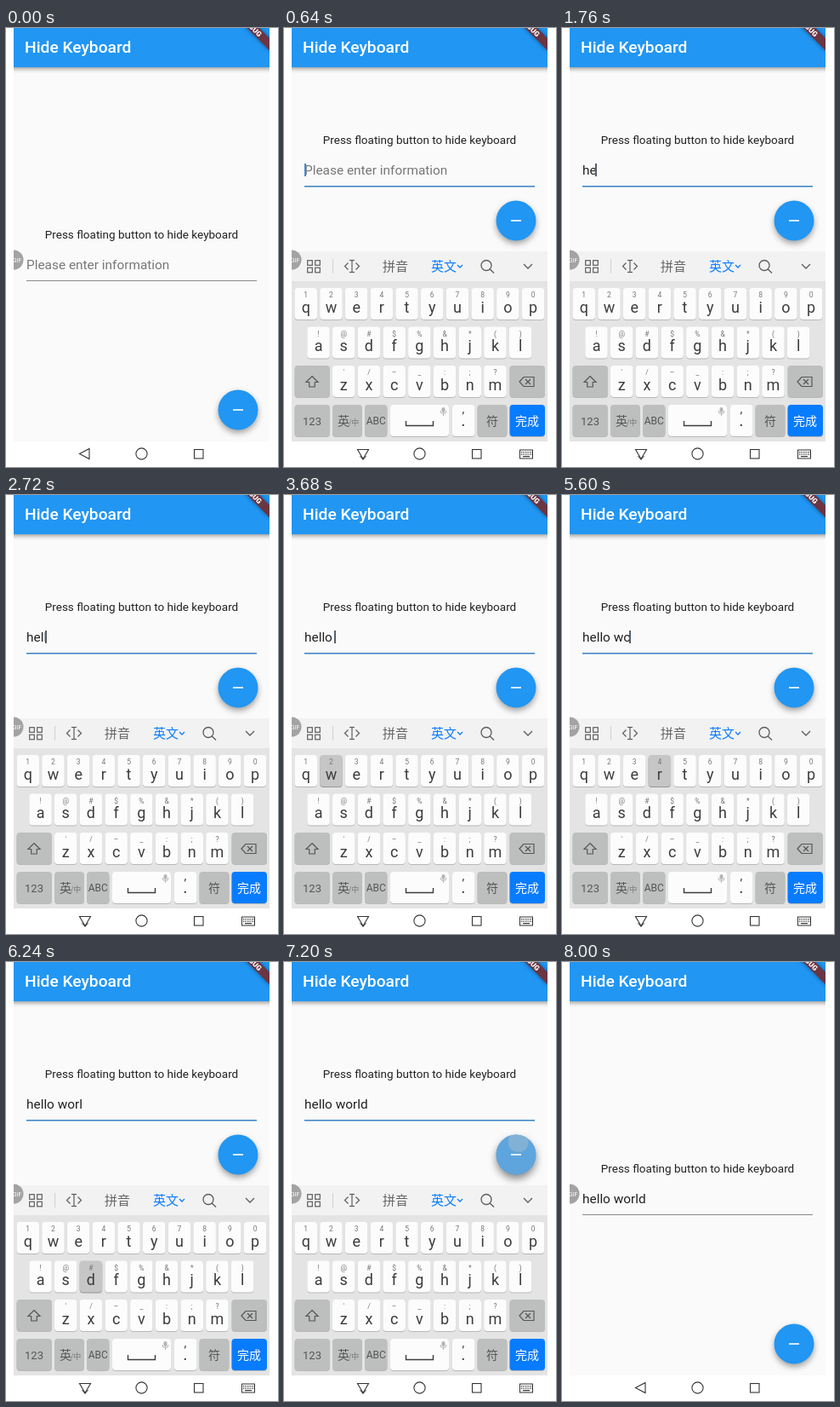
An HTML page with a canvas that plays this animation: 320 px wide and 515 px high, repeating every 9600 ms.

```html
<!DOCTYPE html>
<html lang="zh-Hans">
<head>
<meta charset="utf-8">
<style>
html, body { margin: 0; width: 100%; height: 100%; overflow: hidden; background: #fff; }
canvas { display: block; width: 320px; height: 515px; }
</style>
</head>
<body>
<canvas id="stage"></canvas>
<script>
const canvas = document.getElementById('stage');
const ctx = canvas.getContext('2d');
const dpr = window.devicePixelRatio || 1;
canvas.width = 320 * dpr;
canvas.height = 515 * dpr;

const LOOP = 9600, STEP = 160;
const LEFT = 9, RIGHT = 310, INSET = 222;
const OPEN_AT = 640, CLOSE_AT = 7520, TAP_AT = 7040, SETTLED_AT = 8000;
const ROBOTO = 'Roboto, sans-serif';
const CJK = '"Noto Sans CJK SC", "Noto Sans CJK", sans-serif';
const BLUE = '#2196f3';

// Each press lasts one step; the letter appears on release.
const presses = [
  [1280, 'h'], [1600, 'e'], [2080, 'l'], [2560, 'l'], [2880, 'o'], [3360, ' '],
  [3680, 'w'], [4960, 'o'], [5600, 'r'], [5920, 'l'], [6240, 'd']
];
const blinks = [480, 800, 1280, 1920, 2400, 2880, 3360, 3840, 4320, 4800,
  5280, 5760, 6400, 6720, 7360, 7520];

const rows = [
  { x: 12.5, y: 305, keys: 'qwertyuiop', marks: '1234567890' },
  { x: 27.3, y: 350.5, keys: 'asdfghjkl', marks: '!@#$%&*()' },
  { x: 57, y: 396, keys: 'zxcvbnm', marks: "'/–_:;?" }
];
const PITCH = 29.7, KEY_W = 26.5, KEY_H = 37;

function rect(x, y, w, h, color) {
  ctx.fillStyle = color;
  ctx.fillRect(x, y, w, h);
}

function disc(x, y, r, color) {
  ctx.fillStyle = color;
  ctx.beginPath();
  ctx.arc(x, y, r, 0, Math.PI * 2);
  ctx.fill();
}

function ring(x, y, r, color, width) {
  ctx.strokeStyle = color;
  ctx.lineWidth = width;
  ctx.beginPath();
  ctx.arc(x, y, r, 0, Math.PI * 2);
  ctx.stroke();
}

function line(points, color, width = 1.2, close = false) {
  ctx.strokeStyle = color;
  ctx.lineWidth = width;
  ctx.beginPath();
  points.forEach(([x, y]) => ctx.lineTo(x, y));
  if (close) ctx.closePath();
  ctx.stroke();
}

function box(x, y, w, h, color, width = 1.2) {
  ctx.strokeStyle = color;
  ctx.lineWidth = width;
  ctx.strokeRect(x, y, w, h);
}

function text(str, x, y, size, color, { align = 'center', weight = 400, family = ROBOTO } = {}) {
  ctx.font = `${weight} ${size}px ${family}`;
  ctx.textAlign = align;
  ctx.fillStyle = color;
  ctx.fillText(str, x, y);
}

function withShadow(alpha, blur, dy, draw) {
  ctx.save();
  ctx.shadowColor = `rgba(0,0,0,${alpha})`;
  ctx.shadowBlur = blur * dpr;
  ctx.shadowOffsetY = dy * dpr;
  draw();
  ctx.restore();
}

function drawBanner() {
  ctx.save();
  ctx.translate(RIGHT, -21);
  ctx.rotate(Math.PI / 4);
  withShadow(0.45, 5, 0, () => rect(-34, 23.4, 68, 10, '#6b3542'));
  text('DEBUG', 0, 31.5, 8.5, '#fff', { weight: 900 });
  ctx.restore();
}

function drawAppBar() {
  withShadow(0.4, 5, 2, () => rect(LEFT - 10, -10, RIGHT - LEFT + 20, 56, BLUE));
  text('Hide Keyboard', 22, 29, 19.2, '#fff', { align: 'left', weight: 500 });
  drawBanner();
}

function drawField(t, lift, typed) {
  const focused = t >= 480 && t < CLOSE_AT;
  text('Press floating button to hide keyboard', 159.5, 247 - lift, 13.5, '#212121');
  text(typed || 'Please enter information', 24, 283 - lift, 15.4,
    typed ? '#212121' : '#777', { align: 'left' });
  rect(24, 296 - lift, 271, focused ? 1.6 : 1, focused ? '#4488c8' : '#8a8a8a');

  if (focused && blinks.filter(b => b <= t).length % 2) {
    ctx.font = `400 15.4px ${ROBOTO}`;
    const end = 24 + ctx.measureText(typed).width;
    rect(Math.max(24, Math.floor(end - 1.6)), 270 - lift, 2, 15, typed ? '#56606c' : '#3f87d0');
  }
}

function drawButton(t, lift) {
  const x = 273, y = 448 - lift, r = 23.5;
  const touched = t >= TAP_AT && t < SETTLED_AT;
  withShadow(touched ? 0.45 : 0.36, touched ? 10 : 7, touched ? 5 : 3.5, () => disc(x, y, r, BLUE));
  if (touched) {
    const fade = Math.min(1, (SETTLED_AT - t) / 480);
    const spread = Math.min(1, (t - TAP_AT) / 480);
    ctx.save();
    ctx.beginPath();
    ctx.arc(x, y, r, 0, Math.PI * 2);
    ctx.clip();
    ctx.globalAlpha = fade;
    disc(x, y, r, 'rgba(188,188,188,0.4)');
    disc(277 - 4 * spread, y - 17 + 6 * spread, 6 + 18 * spread, 'rgba(200,200,200,0.33)');
    ctx.restore();
  }
  rect(x - 6, y - 0.8, 12, 1.6, '#fff');
}

function key(x, y, w, color = '#fcfcfc', pressed = false) {
  const shape = (dy, fill) => {
    ctx.fillStyle = fill;
    ctx.beginPath();
    ctx.roundRect(x, y + dy, w, KEY_H, 4);
    ctx.fill();
  };
  shape(1, pressed ? '#969696' : '#b8b8b8');
  shape(0, pressed ? '#c6c6c6' : color);
}

function drawToolbar() {
  const ink = '#5c5c5c';
  rect(LEFT, 262, RIGHT - LEFT, 35, '#f2f2f2');
  for (const x of [27.7, 36.7])
    for (const y of [272.7, 281.2]) box(x, y, 5.6, 5.6, ink);
  rect(57, 271, 1, 17, '#d0d0d0');
  line([[80, 273], [80, 286]], ink);
  line([[77, 272.5], [83, 272.5]], ink);
  line([[77, 286.5], [83, 286.5]], ink);
  line([[75.5, 275.5], [71.5, 279.5], [75.5, 283.5]], ink);
  line([[84.5, 275.5], [88.5, 279.5], [84.5, 283.5]], ink);
  text('拼音', 131, 285, 15, '#666', { family: CJK });
  text('英文', 188, 285, 15, '#0a7cff', { family: CJK });
  line([[204, 278], [207, 281], [210, 278]], '#0a7cff', 1.3);
  ring(238, 278.5, 6, ink, 1.3);
  line([[242.3, 283], [247, 287.5]], ink, 1.4);
  line([[282, 277], [287, 282], [292, 277]], ink, 1.3);
}

function drawKeyboard(held) {
  const grey = '#bdbfbf', ink = '#3c3c3c';
  rect(LEFT, 262, RIGHT - LEFT, 223, '#e4e4e4');
  drawToolbar();

  for (const { x, y, keys, marks } of rows) {
    [...keys].forEach((letter, i) => {
      const left = x + i * PITCH, mid = left + KEY_W / 2;
      key(left, y, KEY_W, undefined, letter === held);
      text(marks[i], mid, y + 11, 8.5, '#777');
      text(letter, mid, y + 28.5, 18, ink);
    });
  }

  const y3 = rows[2].y, y4 = 442;
  key(12.5, y3, 41.5, grey);
  line([[33, 408.5], [40, 415.5], [36.3, 415.5], [36.3, 421], [29.7, 421], [29.7, 415.5], [26, 415.5]],
    '#555', 1.2, true);
  key(265.5, y3, 41.5, grey);
  line([[277, 415], [282, 409.5], [294, 409.5], [294, 420.5], [282, 420.5]], '#555', 1.2, true);
  line([[284, 412], [290, 418]], '#555');
  line([[290, 412], [284, 418]], '#555');

  key(12.5, y4, 41.5, grey);
  text('123', 33, 465.5, 13, '#555');
  key(57, y4, 35, grey);
  text('英', 70, 465.5, 14, '#555', { family: CJK });
  text('/中', 82, 465.5, 9, '#777', { family: CJK });
  key(95, y4, 26.5, grey);
  text('ABC', 108.3, 465, 12, '#555');
  key(125, y4, 69, undefined, held === ' ');
  line([[143.5, 461], [143.5, 466.5], [175.5, 466.5], [175.5, 461]], ink, 1.4);
  ctx.fillStyle = '#b4b4b4';
  ctx.beginPath();
  ctx.roundRect(185.5, 445, 4, 6, 2);
  ctx.fill();
  line([[184, 449], [185, 452], [190, 452], [191, 449]], '#b4b4b4', 1);
  line([[187.5, 452], [187.5, 455]], '#b4b4b4', 1);
  key(198, y4, 26.5);
  text(',', 211, 452, 14, ink);
  text('.', 211, 467, 20, ink);
  key(227.5, y4, 35, grey);
  text('符', 245, 465.5, 14, '#555', { family: CJK });
  key(265.5, y4, 41.5, '#087cff');
  text('完成', 286, 465.5, 14, '#fff', { family: CJK });
}

function drawNavBar(open) {
  const ink = '#333';
  rect(0, 485, 320, 30, '#fff');
  if (open) {
    line([[86.5, 494.5], [99.5, 494.5], [93, 505.5]], ink, 1.1, true);
    line([[89.5, 502], [93, 506.5], [96.5, 502]], ink, 1);
    box(277.5, 495, 15, 10, ink, 1);
    for (const y of [497, 499.5])
      for (let x = 279; x < 292; x += 2.5) rect(x, y, 1.3, 1.3, ink);
    rect(281, 502, 8, 1.2, ink);
  } else {
    line([[86.5, 499.5], [98, 493.5], [98, 505.5]], ink, 1.1, true);
  }
  ring(159.5, 499.5, 6.6, ink, 1.1);
  box(221.5, 494.5, 10.5, 10.5, ink, 1.1);
}

function drawBadge() {
  disc(9, 272, 11.5, '#a3a3a3');
  text('GIF', 13, 275, 7, '#fff');
}

function draw(t) {
  const open = t >= OPEN_AT && t < CLOSE_AT;
  const typed = presses.filter(([at]) => at + STEP <= t).map(p => p[1]).join('');
  const current = presses.find(([at]) => t >= at && t < at + STEP);

  ctx.setTransform(dpr, 0, 0, dpr, 0, 0);
  rect(0, 0, 320, 515, '#fff');
  ctx.save();
  ctx.beginPath();
  ctx.rect(LEFT, 0, RIGHT - LEFT, 515);
  ctx.clip();
  rect(LEFT, 0, RIGHT - LEFT, 485, '#fafafa');
  drawAppBar();
  drawField(t, open ? INSET / 2 : 0, typed);
  drawButton(t, open ? INSET : 0);
  if (open) drawKeyboard(current && current[1]);
  drawNavBar(open);
  drawBadge();
  ctx.restore();
}

const start = performance.now();
function tick() {
  const t = (performance.now() - start) % LOOP;
  draw(Math.floor(t / STEP) * STEP);
  requestAnimationFrame(tick);
}
tick();
</script>
</body>
</html>
```
